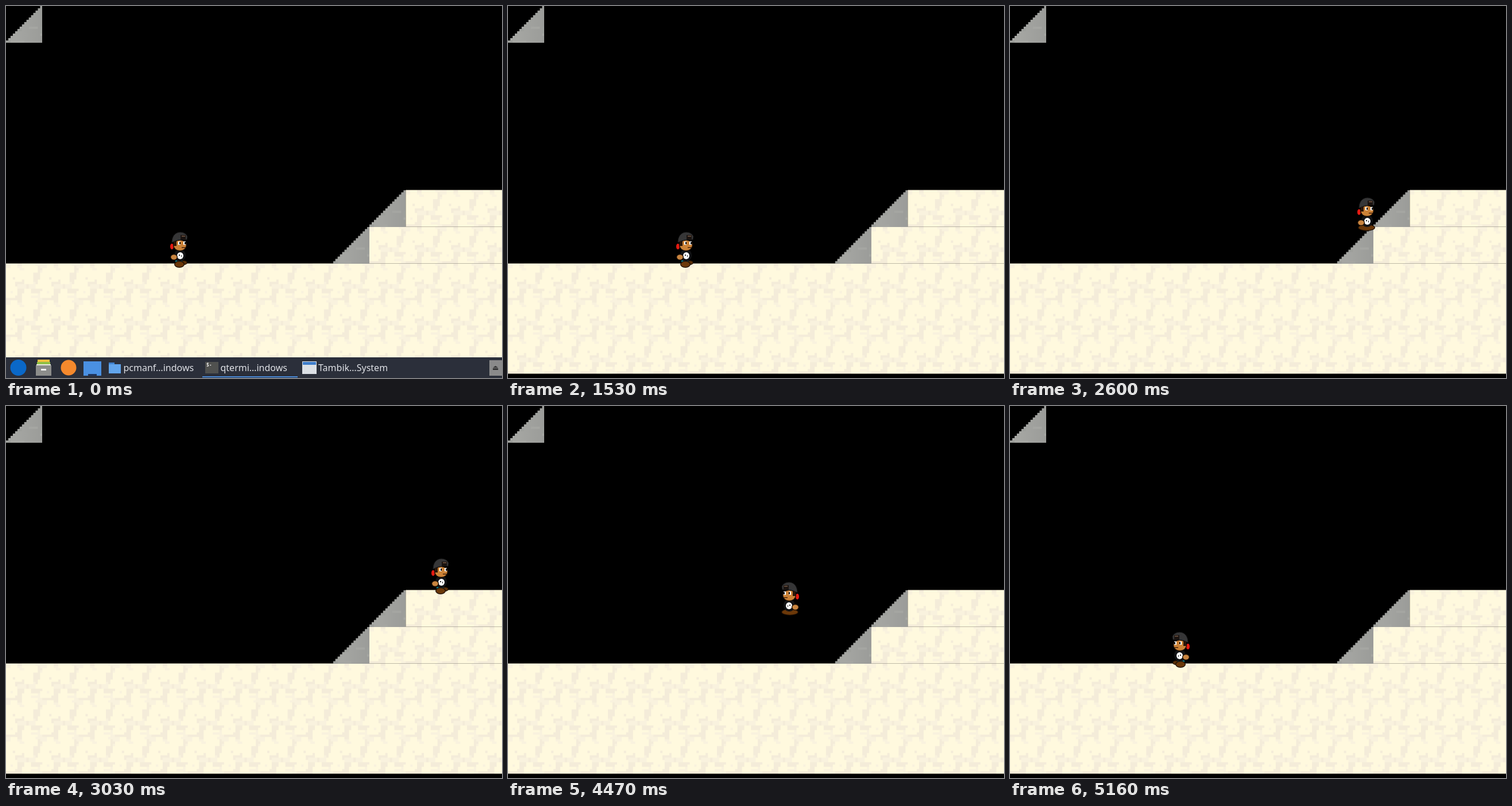
An HTML page with a canvas that plays this animation: 864 by 648 pixels, repeating every 5790 ms.

```html
<!DOCTYPE html>
<html lang="en">
<head>
<meta charset="utf-8">
<title>Platform walk</title>
<style>
  html, body { margin: 0; height: 100%; overflow: hidden; background: #000; }
  canvas { display: block; }
</style>
</head>
<body>
<canvas id="stage" width="864" height="648"></canvas>
<script>
const LOOP = 5790, TILE_W = 63.3, TILE_H = 64, CELL = 4;
const TURN = 3530, LEDGE_LEFT = 4130, LANDED = 5140;
const ctx = document.getElementById('stage').getContext('2d');

// Where the hero is at the moments he changes speed
const path = [
  [0, 286], [1490, 286], [2100, 396], [2920, 741], [3540, 741],
  [3620, 736], [3920, 736], [4880, 282], [LOOP, 282]
];

function rect(g, color, x, y, w, h) {
  g.fillStyle = color;
  g.fillRect(x, y, w, h);
}

function oval(g, color, x, y, rx, ry) {
  g.fillStyle = color;
  g.beginPath();
  g.ellipse(x, y, rx, ry, 0, 0, 2 * Math.PI);
  g.fill();
}

function outlined(g, color, x, y, rx, ry) {
  oval(g, '#1a0d02', x, y, rx, ry);
  oval(g, color, x, y, rx - 1.3, ry - 1.3);
}

function layer(w, h, paint) {
  const canvas = document.createElement('canvas');
  canvas.width = w;
  canvas.height = h;
  paint(canvas.getContext('2d'));
  return canvas;
}

function randomizer(seed) {
  return max => {
    seed = seed * 16807 % 2147483647;
    return Math.floor(seed / 2147483647 * max);
  };
}

// Scatters blocks that wrap around the edges of a 64 px tile
function scatter(g, random, color, count, size) {
  for (let i = 0; i < count; i++) {
    const x = random(16) * CELL, y = random(16) * CELL;
    const w = (size + random(4)) * CELL, h = (size - 1 + random(3)) * CELL;
    for (const left of [x, x - 64]) {
      for (const top of [y, y - 64]) rect(g, color, left, top, w, h);
    }
  }
}

const sand = layer(64, 64, g => {
  const random = randomizer(2024);
  rect(g, '#f4ecd9', 0, 0, 64, 64);
  scatter(g, random, '#f9f2de', 9, 3);
  scatter(g, random, '#fff9de', 18, 3);
  scatter(g, random, '#f9f2de', 5, 1);
});

const rock = layer(64, 64, g => {
  const random = randomizer(77);
  const shade = g.createLinearGradient(0, 0, 64, 0);
  shade.addColorStop(0, '#a9aaa6');
  shade.addColorStop(1, '#9b9c99');
  rect(g, shade, 0, 0, 64, 64);
  scatter(g, random, '#a5a6a2', 7, 2);
  scatter(g, random, '#9d9f9b', 7, 2);
  for (let i = 0; i < 16; i++) g.clearRect(i * CELL, 0, CELL, (15 - i) * CELL);
});

const scenery = layer(864, 648, g => {
  rect(g, '#000', 0, 0, 864, 648);
  g.drawImage(rock, 0, 0, TILE_W, TILE_H);
  g.translate(0, 0.5);
  g.scale(TILE_W / 64, 1);
  g.fillStyle = g.createPattern(sand, 'repeat');
  g.fillRect(0, 448, 900, 192);
  g.fillRect(640, 384, 260, 64);
  g.fillRect(704, 320, 196, 64);
  g.drawImage(rock, 576, 384);
  g.drawImage(rock, 640, 320);
});

function label(g, text, x) {
  g.fillStyle = '#dfe1e6';
  g.font = '16px "Noto Sans", sans-serif';
  g.fillText(text, x, 23);
}

const taskbar = layer(864, 36, g => {
  rect(g, '#2b2f3a', 0, 0, 864, 36);
  g.translate(0, 1);
  oval(g, '#0a68c8', 21.5, 17, 14, 14);

  ['#f0c040', '#8fc045', '#e8e8e0'].forEach((color, i) =>
    rect(g, color, 55 - i, 3 + i * 4, 21 + i * 2, 4));
  rect(g, '#8c8d8b', 52, 13, 27, 18);
  rect(g, '#f2f2f2', 61, 19, 9, 3);

  oval(g, '#f5892d', 109, 17, 13.5, 13.5);

  rect(g, '#4a90e2', 135, 6, 31, 25);
  rect(g, '#20345a', 143, 28, 15, 3);

  rect(g, '#3f82cf', 179, 8, 10, 5);
  rect(g, '#62a5ec', 179, 11, 21, 16);
  label(g, 'pcmanf…indows', 204.5);

  rect(g, '#4a8ad8', 342, 32, 166, 2);
  rect(g, '#50514f', 347, 7, 23, 20);
  g.fillStyle = '#eee';
  g.font = 'bold 8px "Noto Sans Mono", monospace';
  g.fillText('$-', 349, 15);
  label(g, 'qtermi…indows', 373.5);

  rect(g, '#dde1e6', 516, 6, 25, 22);
  rect(g, '#3f7ecb', 517, 7, 23, 5);
  label(g, 'Tambik…System', 544);

  rect(g, '#8a8a8a', 842, 4, 22, 27);
  g.fillStyle = '#333';
  g.font = '12px "DejaVu Sans", sans-serif';
  g.fillText('⏏', 847, 21);
});

function paintFeet(g, running, bob) {
  if (running) {
    outlined(g, '#6b3809', 16, 52, 15, 6);
    return;
  }
  outlined(g, '#5a3008', 24, 53 - bob, 6, 4);
  rect(g, '#0c7480', 9, 49, 12, 4);
  outlined(g, '#6b3809', 16, 56, 9, 6);
}

function paintHero(g, { x, y, facing, running, bob }) {
  g.save();
  g.translate(facing > 0 ? x : x + 31, y);
  g.scale(facing, 1);
  paintFeet(g, running, bob);

  // Shirt, print and hand
  oval(g, '#111214', 17, 40, 10, 11);
  oval(g, '#fff', 17.5, 41, 5.5, 6);
  rect(g, '#222', 15, 39, 2, 2);
  rect(g, '#222', 19, 40, 1, 3);
  outlined(g, '#c98540', 6.5, 43.5, 6.5, 5.5);

  // Head
  oval(g, '#e51a12', 3, 25, 3, 5);
  outlined(g, '#cb8237', 17, 23, 12, 10);
  rect(g, '#2c1608', 6, 16, 5, 8);
  for (const eye of [14, 23]) {
    rect(g, '#fff', eye, 16, 4, 6);
    rect(g, '#111', eye + 2, 17, 2, 4);
  }
  rect(g, '#4a260d', 20, 26, 7, 1.5);

  // Cap: a dome with a strap in front
  g.fillStyle = '#363637';
  g.strokeStyle = '#171717';
  g.beginPath();
  g.moveTo(3, 18);
  g.bezierCurveTo(3, -5, 27, -3, 30, 8);
  g.lineTo(29, 13);
  g.quadraticCurveTo(14, 12, 3, 18);
  g.fill();
  g.stroke();
  rect(g, '#1a1310', 18, 5, 9, 8);
  rect(g, '#604838', 20, 6, 6, 2);
  g.restore();
}

function paintPuff(g, { x, y, facing }) {
  const middle = x + 15.5;
  oval(g, '#fff', middle - facing * 19, y + 57, 9, 8);
  oval(g, '#fff', middle - facing * 9, y + 59, 6, 4);
}

// The picture advances in steps, a little slower after the turn
function stepped(time) {
  const [origin, gap] = time < TURN ? [1530, 82] : [3960, 85];
  const step = Math.floor((time - origin) / gap);
  return { step, now: Math.max(0, origin + step * gap) };
}

function heroAt(time) {
  const { step, now } = stepped(time);
  const next = path.findIndex(([t]) => t > now);
  const [[t0, x0], [t1, x1]] = [path[next - 1], path[next]];
  const velocity = (x1 - x0) / (t1 - t0);
  const x = Math.round(x0 + velocity * (now - t0));

  // The slope lifts him; past the ledge he sinks at a steady rate
  const ground = Math.min(448, Math.max(320, 448 - (x + 25 - 570)));
  const falling = now > LEDGE_LEFT && now < LANDED;
  const y = falling ? 265 + (now - LEDGE_LEFT) * 0.123 : ground - 54;

  const fast = Math.abs(velocity) > 0.3;
  const puff = fast && now - t0 < 80;
  return {
    x, y: Math.round(y), puff,
    facing: time < TURN ? 1 : -1,
    running: falling || fast && !puff,
    bob: velocity ? Math.abs(step % 2) * 2 : 0
  };
}

function frame() {
  const time = performance.now() % LOOP;
  const hero = heroAt(time);
  ctx.drawImage(scenery, 0, 0);
  if (hero.puff) paintPuff(ctx, hero);
  paintHero(ctx, hero);
  if (time < 570) ctx.drawImage(taskbar, 0, time < 490 ? 612 : 630);
  requestAnimationFrame(frame);
}
frame();
</script>
</body>
</html>
```
